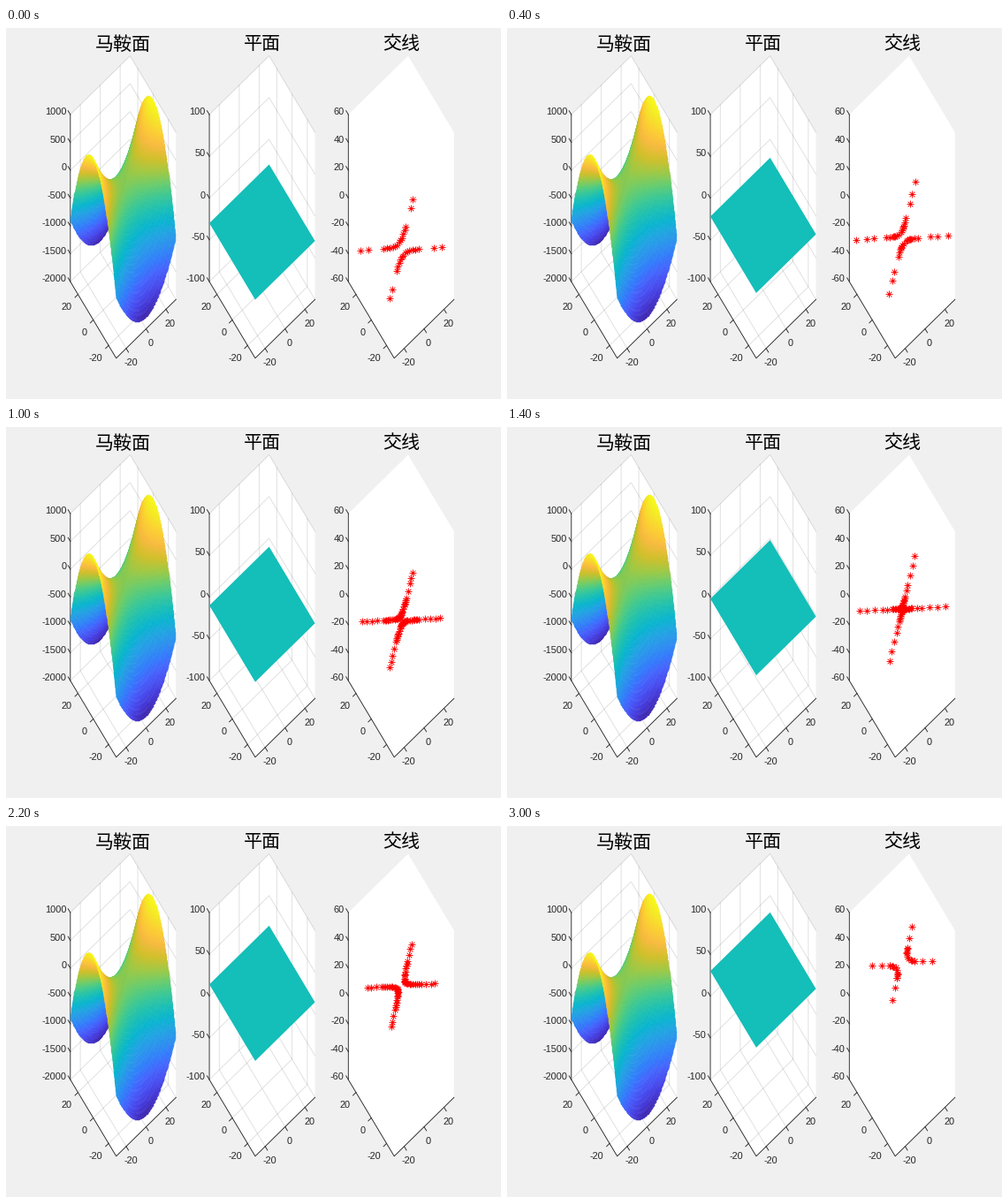
Write a matplotlib script that moves like this. It is 560 px wide and 420 px high and loops after 3200 ms.

```python
import numpy as np
import matplotlib.pyplot as plt
from matplotlib.animation import FuncAnimation
from matplotlib.colors import LinearSegmentedColormap
from matplotlib.path import Path

W, H, DPI = 560, 420, 100
PX = 72 / DPI                      # points per pixel
INK = "#262626"
R = 30                             # half range of x and y
LEFTS = (72.8, 230.05, 387.3)
AZ, EL = np.radians(-37.5), np.radians(30)

# Projected unit vectors, stretched to fill each subplot box
AX, AY = np.cos(AZ), np.sin(AZ)
BX, BY, BZ = -np.sin(AZ) * np.sin(EL), np.cos(AZ) * np.sin(EL), np.cos(EL)
BOX_W, BOX_H, MID_Y = 119.5, 342.3, 202.65
SX, SY = BOX_W / (AX - AY), BOX_H / (BX + BY + BZ)

PARULA = LinearSegmentedColormap.from_list("parula", [
    (.2422, .1504, .6603), (.2706, .2147, .8364), (.2813, .3006, .9414),
    (.2699, .3892, .9906), (.1963, .4847, .9892), (.1687, .5703, .9359),
    (.1248, .6459, .8883), (.0297, .7082, .8163), (.0964, .7500, .7120),
    (.2161, .7843, .5923), (.3909, .8029, .4354), (.6174, .7876, .2612),
    (.8203, .7498, .1535), (.9728, .7298, .2394), (.9892, .8136, .1885),
    (.9597, .9135, .1423), (.9769, .9839, .0805)])

fig = plt.figure(figsize=(W / DPI, H / DPI), dpi=DPI, facecolor="#f0f0f0")
ax = fig.add_axes([0, 0, 1, 1])
ax.set(xlim=(0, W), ylim=(H, 0))
ax.axis("off")


def saddle(x, y):
    return x**2 - 2 * y**2


class Panel:
    def __init__(self, left, title, zmin, zmax, zstep, grid):
        self.cx, self.zmin, self.zmax = left + BOX_W / 2, zmin, zmax
        zticks = range(zmin, zmax + 1, zstep)
        lo, hi = zmin, zmax
        hexagon = [(-R, R, lo), (-R, R, hi), (R, R, hi),
                   (R, -R, hi), (R, -R, lo), (-R, -R, lo)]
        ax.fill(*self.path(hexagon), color="white", lw=0, zorder=1)
        if grid:
            for t in (-20, 0, 20):
                self.line([(t, -R, lo), (t, R, lo), (t, R, hi)], alpha=.15)
                self.line([(-R, t, lo), (R, t, lo), (R, t, hi)], alpha=.15)
            for z in zticks:
                self.line([(-R, R, z), (R, R, z), (R, -R, z)], alpha=.15)
        self.line([(-R, R, hi), (-R, R, lo), (-R, -R, lo), (R, -R, lo)])
        for t in (-20, 0, 20):
            self.tick((t, -R, lo), (2.6, 4.3), t, (5, 15.5), "center")
            self.tick((-R, t, lo), (-3.4, 3.4), t, (-6.5, 13.8), "right")
        for z in zticks:
            self.tick((-R, R, z), (-2.6, -4.3), z, (-4.5, -4), "right")
        ax.text(self.cx, 16, title, family="Noto Sans CJK JP", weight="light",
                size=21 * PX, ha="center", va="center_baseline", color="black")

    def project(self, x, y, z):
        u, v = x / (2 * R), y / (2 * R)
        w = (z - self.zmin) / (self.zmax - self.zmin) - .5
        return (self.cx + SX * (AX * u + AY * v),
                MID_Y - SY * (BX * u + BY * v + BZ * w))

    def path(self, points):
        return self.project(*np.array(points, float).T)

    def line(self, points, **style):
        ax.plot(*self.path(points), color=INK, lw=.9 * PX, zorder=2, **style)

    def tick(self, point, mark, value, shift, ha):
        x, y = self.project(*point)
        ax.plot([x, x + mark[0]], [y, y + mark[1]], color=INK,
                lw=.9 * PX, zorder=2)
        ax.text(x + shift[0], y + shift[1], str(value), color=INK, ha=ha,
                va="center_baseline", family="Liberation Sans", size=11 * PX)


left = Panel(LEFTS[0], "马鞍面", -2000, 1000, 500, True)
middle = Panel(LEFTS[1], "平面", -100, 100, 50, True)
right = Panel(LEFTS[2], "交线", -60, 60, 20, False)

# Saddle, ordered back to front so nearer cells cover farther ones
edge = np.linspace(R, -R, 101)
gx, gy = np.meshgrid(edge, edge)
cx, cy = np.meshgrid(*[(edge[1:] + edge[:-1]) / 2] * 2)
ax.pcolormesh(*left.project(gx, gy, saddle(gx, gy)), saddle(cx, cy),
              cmap=PARULA, vmin=-1800, vmax=900, shading="flat",
              edgecolors="face", linewidth=.4 * PX, antialiased=True, zorder=3)
ax.set(xlim=(0, W), ylim=(H, 0))

plane, = ax.fill([0, 1, 1], [0, 0, 1], color="#14beb9", lw=0, zorder=3)

d = .7071
arms = [(-1, 0), (1, 0), (0, -1), (0, 1), (-d, -d), (d, d), (-d, d), (d, -d)]
asterisk = Path(arms, [Path.MOVETO, Path.LINETO] * 4)
stars, = ax.plot([], [], ls="", marker=asterisk, ms=8 * PX, mfc="none",
                 mec="red", mew=.9 * PX, zorder=4)

side = np.linspace(-R, R, 200)
mx, my = np.meshgrid(side, side)
mz = saddle(mx, my)


def update(i):
    level = -30 + 4 * i
    corners = [(-R, -R, level), (R, -R, level), (R, R, level), (-R, R, level)]
    plane.set_xy(np.column_stack(middle.path(corners)))
    hit = np.abs(mz - level) <= .5
    stars.set_data(*right.project(mx[hit], my[hit], level))
    return plane, stars


anim = FuncAnimation(fig, update, frames=16, interval=200, repeat=True,
                     repeat_delay=0)
plt.show()
```
